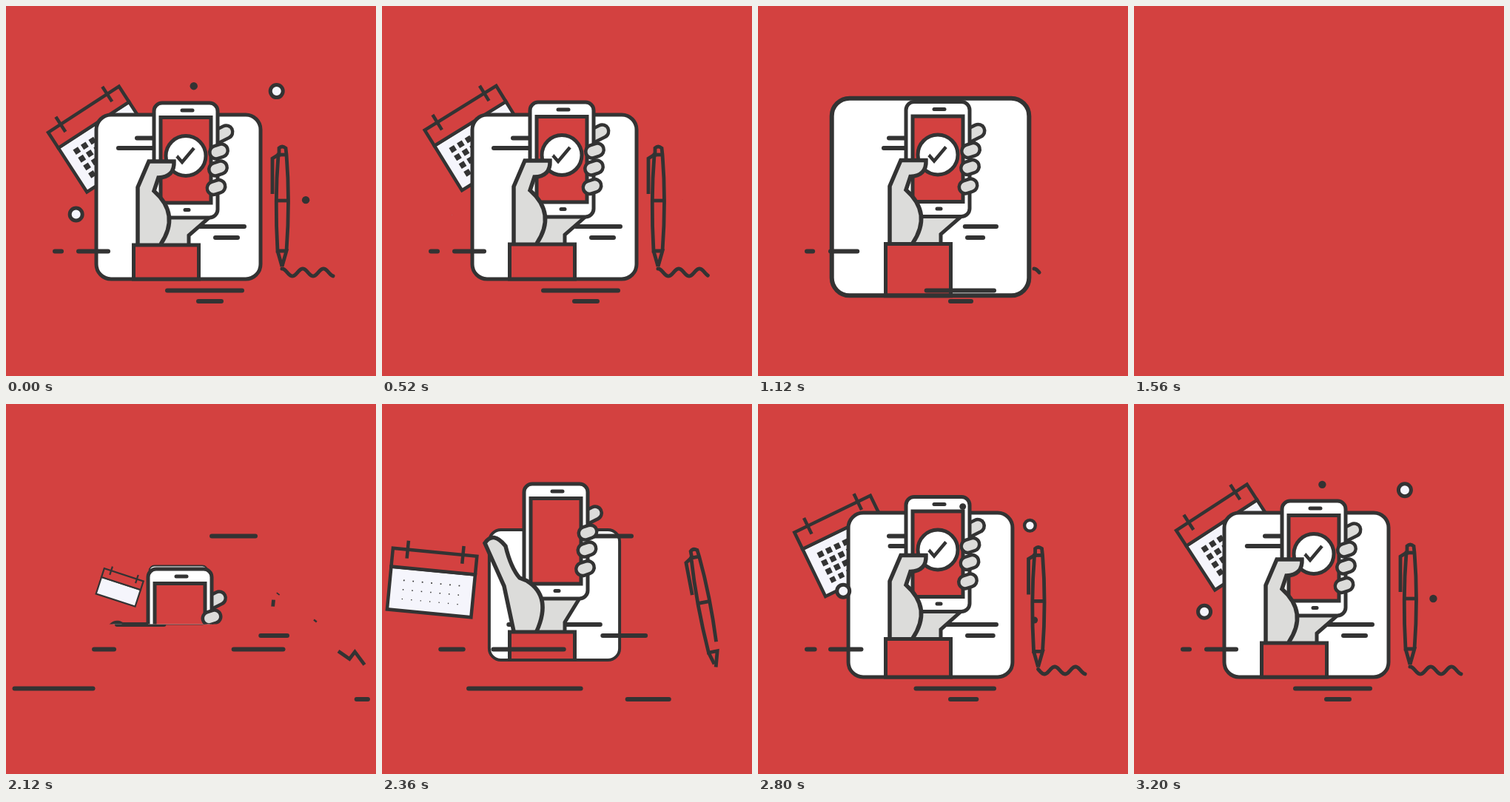
These frames come from a looping animation (500x500 px, 3.24 s). An HTML page with a canvas:

```html
<!DOCTYPE html>
<html lang="en">
<head>
<meta charset="utf-8">
<title>Mobile signing</title>
<style>
html, body { margin: 0; height: 100%; overflow: hidden; background: #d34140; }
canvas { display: block; width: 100%; height: 100%; }
</style>
</head>
<body>
<canvas id="stage" width="500" height="500"></canvas>
<script>
const c = document.getElementById('stage').getContext('2d');
const RED = '#d34140', INK = '#333333', SKIN = '#dcdcda', PAPER = '#f5f5fc', WHITE = '#fff';
const LOOP = 3240, STEP = 40, BLANK = 1700;
const CX = 233, CY = 258, HALF = 111;
const { PI, min, max, sin, cos } = Math;

// Time 0 is the finished scene: entrances run before it, exits after it.
let now = 0;
const span = (start, end) => max(0, min(1, (now - start) / (end - start)));
const easeIn = (start, end, n = 2) => span(start, end) ** n;
const easeOut = (start, end, n = 2) => 1 - (1 - span(start, end)) ** n;
const bump = (start, end) => sin(PI * span(start, end));
const smooth = (start, end) => { const p = span(start, end); return p * p * (3 - 2 * p); };
const pull = (p, k) => p * p * ((k + 1) * p - k);
const backIn = (start, end, k) => pull(span(start, end), k);
const backOut = (start, end, k) => 1 - pull(1 - span(start, end), k);
const mix = (a, b, p) => a + (b - a) * p;

function paint(path, fill, width, stroke = INK) {
  if (fill) { c.fillStyle = fill; c.fill(path); }
  if (width) { c.strokeStyle = stroke; c.lineWidth = width; c.stroke(path); }
}

function poly(...p) {
  const path = new Path2D();
  for (let i = 0; i < p.length; i += 2) path.lineTo(p[i], p[i + 1]);
  return path;
}

function box(x, y, w, h, r = 0) {
  const path = new Path2D();
  path.roundRect(x, y, w, h, r);
  return path;
}

function disc(r) {
  const path = new Path2D();
  path.arc(0, 0, r, 0, 2 * PI);
  return path;
}

function rounded(path, width, stroke) {
  c.lineCap = 'round';
  paint(path, null, width, stroke);
  c.lineCap = 'butt';
}

function group(x, y, angle, scale, draw) {
  if (scale <= 0.01) return;
  c.save();
  c.translate(x, y);
  c.rotate(angle * PI / 180);
  c.scale(scale, scale);
  draw();
  c.restore();
}

// Strokes only the stretch of a path between two lengths.
function trim(path, from, to, width) {
  if (to - from < 0.5) return;
  c.setLineDash([to - from, 9999]);
  c.lineDashOffset = -from;
  paint(path, null, width);
  c.setLineDash([]);
}

// A line shoots out of its origin head first; on leaving, the tail catches up with the head.
function rule(y, origin, head, tail, gone, lag = 0, delay = 0) {
  const front = mix(origin, head, easeOut(-1244 + delay, -640 + delay));
  const rest = mix(origin, tail, easeOut(-1142 + lag, -322 + lag));
  const back = mix(rest, head, easeIn(800, gone, 3));
  if (Math.abs(front - back) > 0.5) rounded(poly(front, y, back, y), 6);
}

function innerRules() {
  rule(178.5, 337, 177, 215, 1280, 420);
  rule(192, 215, 215, 151, 1280, 420);
  rule(298, 150, 322, 262, 1280, 180);
  rule(313, 380, 283, 313, 1280, 100);
}

function outerRules() {
  rule(331.5, 150, 66, 75, 1500);
  rule(331.5, 430, 98, 138, 1500, -60);
  rule(384.5, 0, 319, 218, 1500);
  rule(399, 500, 260, 291, 1500, 0, 90);
}

function calendar() {
  const arrive = easeOut(-1180, -880, 3), level = easeOut(-880, -680), swing = smooth(-720, -320);
  const lift = smooth(480, 840), tuck = easeIn(840, 1120);
  const x = CX - 166 * arrive + 20 * level + 44 * swing + 5 * lift + 64 * tuck;
  const y = CY - 10 * arrive - 13 * level - 55 * swing - 44 * lift + 74 * tuck;
  const angle = 30 - 24.5 * arrive - 5.5 * level - 33 * swing + 37 * lift + 36 * tuck;
  group(x, y, angle, arrive - 0.1 * lift - 0.9 * tuck, () => {
    c.translate(-57, -48);
    const sheet = 40 + 18 * arrive + 13 * level;
    paint(box(0, 25, 114, sheet), PAPER, 4.5);
    paint(box(0, 0, 114, 25), RED, 4.5);
    for (const ring of [20, 95]) paint(poly(ring, -12, ring, 12), null, 4.5);
    const grow = 13 * span(-960, -360);
    c.fillStyle = INK;
    for (let row = 0; row < 4; row++) {
      const s = min(7.8, grow * (1 - 0.12 * row));
      const top = 42 + 12.6 * row;
      if (top > 21 + sheet) continue;
      for (let col = 0; col < 7; col++)
        c.fillRect(19 + 12.5 * col - s / 2, top - s / 2, s, s);
    }
  });
}

function card(scale) {
  group(CX, CY, 0, scale, () => paint(box(-HALF, -HALF, 2 * HALF, 2 * HALF, 20), WHITE, 5));
}

function finger(x, y, tail = 3.5, tilt = 0.33) {
  const pill = poly(x - tail, y + tail * tilt, x + 3.5, y - 3.5 * tilt);
  rounded(pill, 22);
  rounded(pill, 13, SKIN);
}

function phone() {
  group(243, 208.5, -4 * bump(-860, -460), 1, () => {
    c.translate(-243, -208.5);
    paint(box(200, 131, 86, 155, 11), WHITE, 5);
    paint(box(209, 150.5, 68, 115.5), RED, 5);
    rounded(poly(238, 141, 252, 141), 5);
    rounded(poly(242, 275.5, 247, 275.5), 5);
    group(243, 202.5, 0, backOut(-730, -440, 1.7), () => paint(disc(27), WHITE, 5));
    // The tick slides in from the left and stops inside the badge.
    trim(poly(213, 201, 219, 196, 231, 203, 238, 211, 254, 192),
      21.7 * smooth(-680, -450), 58 * smooth(-740, -450), 4.5);
  });
}

// Each outline point moves from its closed to its open place.
function thumb() {
  const open = 1 - backOut(-880, -480, 3);
  const at = (x, y, openX, openY) => [mix(x, openX, open), mix(y, openY, open)];
  const path = new Path2D();
  path.moveTo(178, 322);
  path.lineTo(...at(178, 245, 165, 261));
  path.lineTo(...at(193, 210, 139, 203));
  path.quadraticCurveTo(...at(210, 210, 150, 186), ...at(227, 210, 167, 207));
  path.quadraticCurveTo(...at(228, 231, 174, 236), ...at(206, 232, 186, 250));
  path.lineTo(...at(200, 250, 196, 254));
  path.quadraticCurveTo(...at(236, 282, 230, 275), 209, 322);
  paint(path, SKIN, 5.5);
}

function handLift() {
  const u = span(-1115, -215);
  const wobble = -92 * (1 - u) ** 2 * sin(PI * u * 900 / 260);
  const rise = 260 * (1 - easeOut(-1180, -960, 3));
  return rise + wobble - 10.5 * bump(500, 1180) + 260 * easeIn(1100, 1380);
}

function hand(scale) {
  if (scale <= 0.01) return;
  const floor = CY + HALF * scale, lift = handLift();
  const grip = -8 * (1 - smooth(-880, -600)), reach = -9.5 * (1 - smooth(-800, -380));
  c.save();
  c.beginPath();
  c.rect(0, 0, 500, floor);
  c.clip();
  c.translate(0, lift);
  paint(poly(195, 322, 195, 262, 278 + reach, 283 + grip, 247, 310, 247, 322), SKIN, 5);
  finger(294 + reach, 172 + grip, 12, 0.5);
  group(grip, grip, 0, 1, phone);
  finger(287.5 + reach, 196.5 + grip);
  finger(286.5 + reach, 219.5 + grip);
  finger(284 + reach, 245 + grip);
  thumb();
  paint(box(172.5, 323, 88, 320), RED, 5);
  c.restore();
  if (323 + lift < floor) paint(poly(170, floor, 263, floor), null, 5 * scale);
}

const waveY = x => 360 + 5 * cos(2 * PI * (x - 387) / 28);
const penX = () => mix(490, 373, smooth(-1230, -320));

function wave() {
  const a = penX(), b = 442 - 69 * easeIn(400, 1160);
  if (b - a < 0.5) return;
  const path = new Path2D();
  for (let x = a; x < b; x++) path.lineTo(x, waveY(x));
  path.lineTo(b, waveY(b));
  rounded(path, 5);
}

// Coordinates are relative to the tip of the nib.
const BARREL = new Path2D('M0-1L6-22H-6Q-10-90-5-152H-4V-161Q0-165 5-161L6-152Q11-90 6-22');
const CLIP = poly(-5, -152, -13, -147, -13, -99);
const BAND = poly(8, -90, -8, -90), NECK = poly(6, -152, -5, -152);
const NIB = poly(-6, -22, 0, -1);

function pen() {
  const x = penX();
  const shown = easeOut(-1150, -780) - easeIn(480, 1110);
  group(x, waveY(x) - 2, -60 * (1 - easeOut(-1150, -680)), 1, () => {
    trim(BARREL, 0, 335 * shown, 4.8);
    trim(CLIP, 0, 58 * shown, 4.8);
    trim(BAND, 0, 16 * shown, 4.8);
    trim(NECK, 0, 11 * shown, 4.8);
    trim(NIB, 0, 22 * max(0, 3 * shown - 2), 4.8);
  });
}

// Dots spiral out of the card and slow down on their orbits.
function orbit(radius, angle, delay, draw) {
  const p = easeOut(-970, 200, 3);
  const turn = (angle + 77 * (1 - p)) * PI / 180;
  const scale = smooth(-820 + delay, -560 + delay) - smooth(150, 560);
  group(CX + radius * p * cos(turn), CY + radius * p * sin(turn), 0, scale, draw);
}

function dots() {
  const spot = () => paint(disc(5.2), INK);
  const ring = () => paint(disc(8.5), PAPER, 5);
  orbit(141, 170, 0, ring);
  orbit(152, 277.5, 180, spot);
  orbit(196, 312.5, 180, ring);
  orbit(173, 1, 180, spot);
}

function frame() {
  const t = Math.floor(performance.now() % LOOP / STEP) * STEP;
  now = t < BLANK ? t : t - LOOP;
  c.fillStyle = RED;
  c.fillRect(0, 0, 500, 500);
  const scale = easeOut(-1240, -360, 3) - backIn(780, 1490, 2.6);
  calendar();
  card(scale);
  innerRules();
  hand(scale);
  outerRules();
  wave();
  pen();
  dots();
  requestAnimationFrame(frame);
}
frame();
</script>
</body>
</html>
```
